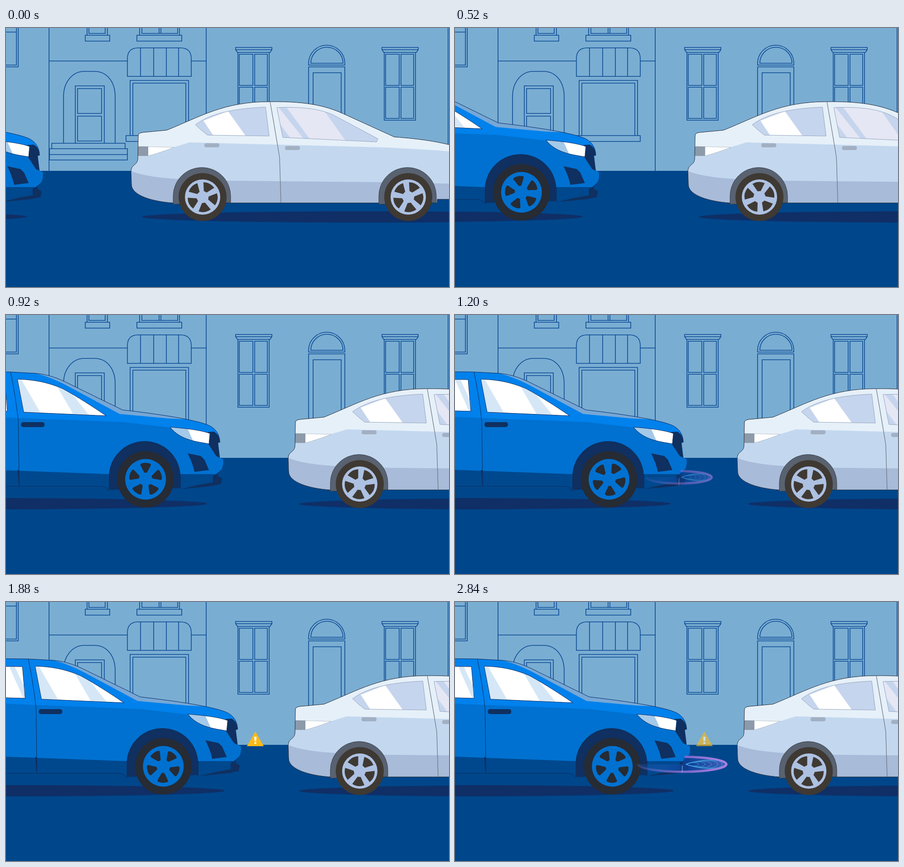
An HTML page that plays this animation: 978x573 px, repeating every 2880 ms.

```html
<!DOCTYPE html>
<html lang="en">
<head>
<meta charset="utf-8">
<title>Distance warning</title>
<style>
  html, body { margin: 0; width: 100%; height: 100%; overflow: hidden; background: #00468b; }
  svg { display: block; width: 100%; height: 100%; }
  .lines { fill: none; stroke: #0a4a94; stroke-width: 1.6; }
  .ink { fill: none; stroke: #1d2632; stroke-width: 1; }
  .edge { fill: none; stroke: #0c2c60; stroke-width: 1; }
  .navy { fill: #0f3060; }
</style>
</head>
<body>
<svg viewBox="0 0 978 573" preserveAspectRatio="none">
  <defs>
    <path id="silverBody" d="M292 237Q293 232 302 231L355 226C430 196 480 163 583 163C670 162 712 174 752 193L857 241C925 246 955 253 978 258L1010 268V379H952V387H368C325 384 277 371 277 346L276 318C276 300 291 305 291 288Z"/>
    <clipPath id="silverClip"><use href="#silverBody"/></clipPath>
    <path id="rearGlass" d="M418 214C450 190 500 178 573 175L581 239L445 237Q430 226 418 214Z"/>
    <clipPath id="rearGlassClip"><use href="#rearGlass"/></clipPath>
    <path id="frontGlass" d="M598 176C650 174 690 178 722 192L821 245L818 252L611 242Z"/>
    <clipPath id="frontGlassClip"><use href="#frontGlass"/></clipPath>

    <path id="blueBody" d="M-30 125L50 126L105 129C140 132 165 145 185 155L297 210C350 216 450 229 485 243C503 250 512 265 512 282H508L512 315L519 319Q521 331 516 341L504 352L425 380H-30Z"/>
    <clipPath id="blueClip"><use href="#blueBody"/></clipPath>
    <path id="blueGlass" d="M65 142C100 143 130 148 165 163C198 181 232 203 261 223L79 215Z"/>
    <clipPath id="blueGlassClip"><use href="#blueGlass"/></clipPath>
    <path id="lamp" d="M402 248C440 251 470 255 490 262L488 285C460 280 425 277 402 248Z"/>
    <clipPath id="lampClip"><use href="#lamp"/></clipPath>

    <g id="sash">
      <path d="M507 43H587V48L583 54H511L507 48ZM507 48H587M512 54H581V204H512ZM515 58H545V127H515ZM549 58H577V127H549ZM515 131H545V200H515ZM549 131H577V200H549Z"/>
    </g>
    <linearGradient id="beam">
      <stop offset="0" stop-color="#8f7be0" stop-opacity=".15"/>
      <stop offset=".5" stop-color="#9a74d8" stop-opacity=".75"/>
      <stop offset="1" stop-color="#a880e0"/>
    </linearGradient>
    <linearGradient id="pool">
      <stop offset="0" stop-color="#2a6fd0" stop-opacity=".1"/>
      <stop offset=".55" stop-color="#0c3f9a" stop-opacity=".8"/>
      <stop offset="1" stop-color="#5a6fd0" stop-opacity=".7"/>
    </linearGradient>
  </defs>

  <rect width="978" height="316" fill="#7aadd2"/>
  <rect y="316" width="978" height="257" fill="#00468b"/>

  <g class="lines">
    <path d="M95 0V316M442 0V316M976 0V316M95 73H268M409 73H442"/>
    <path d="M0 86H27V0M0 82H23V0M0 9H23"/>
    <path d="M175 16H229V29H175ZM179 16V0M224 16V0M183 0V12H219V0"/>
    <path d="M289 16H388V29H289ZM295 16V0M383 16V0M300 0V12H379V0M338 0V12M342 0V12"/>
    <path d="M268 107V68Q268 44 292 44H385Q409 44 409 68V107ZM297 44V107M326 44V107M354 44V107M381 44V107"/>
    <path d="M274 238V116H403V238M280 238V122H397V238M265 238H409V251H265Z"/>
    <path d="M127 255V152C127 116 150 96 172 96H196C220 96 241 116 241 152V255M153 255V128H217V255M158 134H211V189H158ZM158 195H211V250H158Z"/>
    <path d="M101 255H263V267H101ZM96 267H268V280H96ZM96 280H268V292H96Z"/>
    <use href="#sash"/>
    <use href="#sash" x="323"/>
    <path d="M668 82V78A40 40 0 0 1 748 78V82ZM673 78A35.500 35.500 0 0 1 744 78ZM668 316V86H748V316M678 316V99H740V316"/>
  </g>

  <g id="silver">
    <ellipse cx="790" cy="418" rx="490" ry="12.500" fill="#0f2f66"/>
    <g clip-path="url(#silverClip)">
      <rect x="270" y="150" width="740" height="250" fill="#c3d8ef"/>
      <path d="M270 150H1010V276Q960 270 830 264L600 258L405 253L370 264H270Z" fill="#e6f0f9"/>
      <path d="M270 314Q310 332 400 335L495 338L824 341L1010 345V400H270Z" fill="#a8bbd9"/>
      <path d="M314 262L371 264Q340 276 314 283Z" fill="#fff"/>
      <path d="M288 262H314V283H288Z" fill="#8c9aa9"/>
    </g>
    <use href="#silverBody" class="ink"/>
    <path d="M291 262L371 264Q340 276 314 283" fill="none" stroke="#8c9aa9" stroke-width=".6"/>
    <g clip-path="url(#rearGlassClip)">
      <use href="#rearGlass" fill="#c6d5ee"/>
      <path d="M436 205L490 184L530 240H459Z" fill="#fff"/>
    </g>
    <use href="#rearGlass" fill="none" stroke="#93a3bd"/>
    <g clip-path="url(#frontGlassClip)">
      <use href="#frontGlass" fill="#c6d5ee"/>
      <path d="M598 176L602 176L658 246H630L606 214ZM618 174H690L706 188L750 250H674Z" fill="#e5e7f4"/>
    </g>
    <use href="#frontGlass" fill="none" stroke="#93a3bd"/>
    <path d="M583 163Q594 225 604 287L607 387" fill="none" stroke="#6f7885" stroke-width="1.300"/>
    <rect x="438" y="255" width="33" height="9" rx="4" fill="#a2b0c3"/>
    <rect x="616" y="261" width="33" height="9" rx="4" fill="#a2b0c3"/>
    <g id="silverWheels"></g>
  </g>

  <g id="blue">
    <ellipse cx="0" cy="417.500" rx="484" ry="12.500" fill="#0f2f66"/>
    <path d="M425 350H504L516 362L514 374L425 384Z" fill="#00478c"/>
    <path class="navy" d="M497 352L505 341H510L507 355L517 362L514 374L490 379L427 385L465 376L497 370Z"/>
    <g clip-path="url(#blueClip)">
      <rect x="-30" y="120" width="560" height="270" fill="#0071d0"/>
      <path d="M-30 120H530V264L488 262L402 249L300 237L-30 224Z" fill="#0081ec"/>
      <path d="M105 127L135 130L300 208L445 231L400 229L291 219L185 162Q140 137 105 129Z" fill="#76a7d6"/>
      <path d="M-30 341L265 352H530V390H-30Z" fill="#00488e"/>
    </g>
    <path class="edge" d="M-30 125L50 126L105 129C140 132 165 145 185 155L297 210C350 216 450 229 485 243C503 250 512 265 512 282M-30 379H252Q261 380 265 388H268M425 352V384"/>
    <path class="navy" d="M267 387V358A79 79 0 0 1 425 358V383Z"/>
    <path class="navy" d="M484 259L499 258Q512 266 512 282L508 283L512 316L504 312L487 286L491 264Z"/>
    <path class="navy" d="M441 306L470 312L478 320L488 343L456 347Q452 328 441 306Z"/>
    <g clip-path="url(#lampClip)">
      <use href="#lamp" fill="#a4c9e9"/>
      <path d="M438 245H500V290H458Z" fill="#fff"/>
    </g>
    <use href="#lamp" class="edge"/>
    <g clip-path="url(#blueGlassClip)">
      <use href="#blueGlass" fill="#fff"/>
      <path d="M64 140H72L117 218H79ZM148 150L178 165L227 226H192Z" fill="#d5e7f6"/>
    </g>
    <use href="#blueGlass" class="edge"/>
    <path d="M-30 142L37 143L43 213L-30 211Z" fill="#fff"/>
    <path d="M8 143H20L42 190L43 213H39Z" fill="#d5e7f6"/>
    <path class="edge" d="M-30 142L37 143L43 213L-30 211M50 126Q62 185 67 235L69 377"/>
    <path class="navy" d="M65 343H68L70 377H68Z"/>
    <rect class="navy" x="73" y="237" width="52" height="11" rx="5"/>
    <g id="blueWheels"></g>
  </g>

  <g id="radar" fill="none">
    <path id="poolShape" fill="url(#pool)"/>
    <path id="band" stroke="url(#beam)"/>
    <path id="leaves" stroke="#4fb4ea" stroke-width=".8"/>
    <path id="tick" d="M0 3V18" stroke="#9fc4f0"/>
    <path id="rings" stroke="#a9a4ea" stroke-width="1"/>
    <path id="echo" stroke="#d9a5ec" stroke-width=".9"/>
  </g>

  <g id="alert">
    <path d="M550.500 286.500L569 319H532Z" fill="#fdb913"/>
    <path d="M548 298H553L552.300 308H548.700Z" fill="#fff"/>
    <circle cx="550.500" cy="312" r="2.300" fill="#fff"/>
  </g>
</svg>
<script>
const LOOP = 2880, STEP = 40, PING = 800, FIRST_PING = 1100;
const $ = id => document.getElementById(id);
const clamp = v => Math.max(0, Math.min(1, v));

// Keys are [time, wheel position, speed per ms].
const silverKeys = [[0, 434, .38], [320, 568, .47], [680, 747, .38], [860, 781, 0]];
const blueKeys = [[0, -90, .37], [320, 42, .48], [680, 229, .47], [1200, 340, .045], [1520, 348, 0], [1900, 347.300, 0]];

function track(keys, t) {
  const i = keys.findIndex(k => k[0] > t);
  if (i < 0) return keys[keys.length - 1][1];
  const [t0, a, va] = keys[i - 1], [t1, b, vb] = keys[i];
  const d = t1 - t0, s = (t - t0) / d, s2 = s * s, s3 = s2 * s;
  return a * (2 * s3 - 3 * s2 + 1) + b * (3 * s2 - 2 * s3)
    + d * (va * (s3 - 2 * s2 + s) + vb * (s3 - s2));
}

function wheel(x, y, tyre, tyreFill, rim, rimFill, hole) {
  const holes = [0, 1, 2, 3, 4].map(i => `<path d="${hole}" transform="rotate(${i * 72})"/>`).join('');
  return `<g transform="translate(${x} ${y})"><circle r="${tyre}" fill="${tyreFill}"/>
    <circle r="${rim}" fill="${rimFill}"/><g class="spin" fill="${tyreFill}">${holes}</g></g>`;
}

const silverArch = x => `<path d="M${x - 65} 390V372A63.500 63.500 0 0 1 ${x + 62} 372V386Z"
  fill="#596270" stroke="#2c3440" stroke-width=".8"/>`;
$('silverWheels').innerHTML = [434, 888].map(x => silverArch(x) +
  wheel(x, 374, 53, '#3f3933', 39, '#adc1e2', 'M13 -3.500L30 -13.500Q37 0 30 13.500L13 3.500Z')).join('');
$('blueWheels').innerHTML =
  wheel(348, 363.500, 62.500, '#262b34', 45, '#0071d0', 'M15 -3Q14 0 15 3L31 11.500Q34 12 35 9Q38 0 35 -9Q34 -12 31 -11.500Z');

function spin(id, angle) {
  for (const g of $(id).querySelectorAll('.spin')) g.setAttribute('transform', `rotate(${angle})`);
}

// Sweeps left, front, right and back to the top; the rest is behind the car.
const sweep = (rx, ry) => `M${-rx} 0A${rx} ${ry} 0 0 0 ${rx} 0A${rx} ${ry} 0 0 0 ${rx * .05} ${-ry}`;

function drawRadar(t, x) {
  const u = t < FIRST_PING ? 0 : (t - FIRST_PING) % PING / 500;
  const alpha = Math.min(clamp((u - .1) / .17), clamp((.875 - u) / .17));
  $('radar').setAttribute('opacity', alpha);
  if (!alpha) return;
  const rx = 208 * (1 - (1 - u) ** 2), ry = 8 + .11 * rx;
  const near = clamp((.6 - u) / .25), far = clamp((u - .35) / .25);
  $('radar').setAttribute('transform', `translate(${x + 154.500} 359)`);
  $('poolShape').setAttribute('d', sweep(rx, ry) + 'L0 0Z');
  $('band').setAttribute('d', sweep(rx - 3, ry - 2.500));
  $('band').setAttribute('stroke-width', 1 + 4 * near);
  $('leaves').setAttribute('d', [.36, .5, .64, .78, .88].map(k => {
    const r = rx * k, h = ry * k * .75;
    return `M${rx * .08} 0C${r * .5} ${-h} ${r} ${-h} ${r} 0C${r} ${h} ${r * .5} ${h} ${rx * .08} 0`;
  }).join(''));
  $('rings').setAttribute('d', [1, .87].map(k => sweep(rx * k, ry * k)).join(''));
  $('echo').setAttribute('d', [.72, .79, .87, .94].map(k => {
    const r = rx * k, h = ry * k * .75;
    return `M${r * .7} ${-h * .8}Q${r * 1.250} 0 ${r * .7} ${h * .8}`;
  }).join(''));
  for (const id of ['poolShape', 'band', 'leaves', 'tick']) $(id).setAttribute('opacity', near);
  for (const id of ['rings', 'echo']) $(id).setAttribute('opacity', far * .7);
}

function alertLevel(t) {
  const s = t - 1430;
  if (s < 0) return 0;
  const p = s % PING;
  return Math.min(clamp(p / 80), clamp((660 - p) / 80));
}

function draw(time) {
  const t = Math.floor(time % LOOP / STEP) * STEP;
  const sx = track(silverKeys, t), bx = track(blueKeys, t);
  $('silver').setAttribute('transform', `translate(${sx - 434} 0)`);
  $('blue').setAttribute('transform', `translate(${bx - 348} 0)`);
  spin('silverWheels', -48 + (sx - 781) * 1.080);
  spin('blueWheels', 90 + (bx - 345) * .967);
  drawRadar(t, bx);
  $('alert').setAttribute('opacity', alertLevel(t));
}

const start = performance.now();
function tick(now) {
  draw(Math.max(0, now - start));
  requestAnimationFrame(tick);
}
draw(0);
requestAnimationFrame(tick);
</script>
</body>
</html>
```
